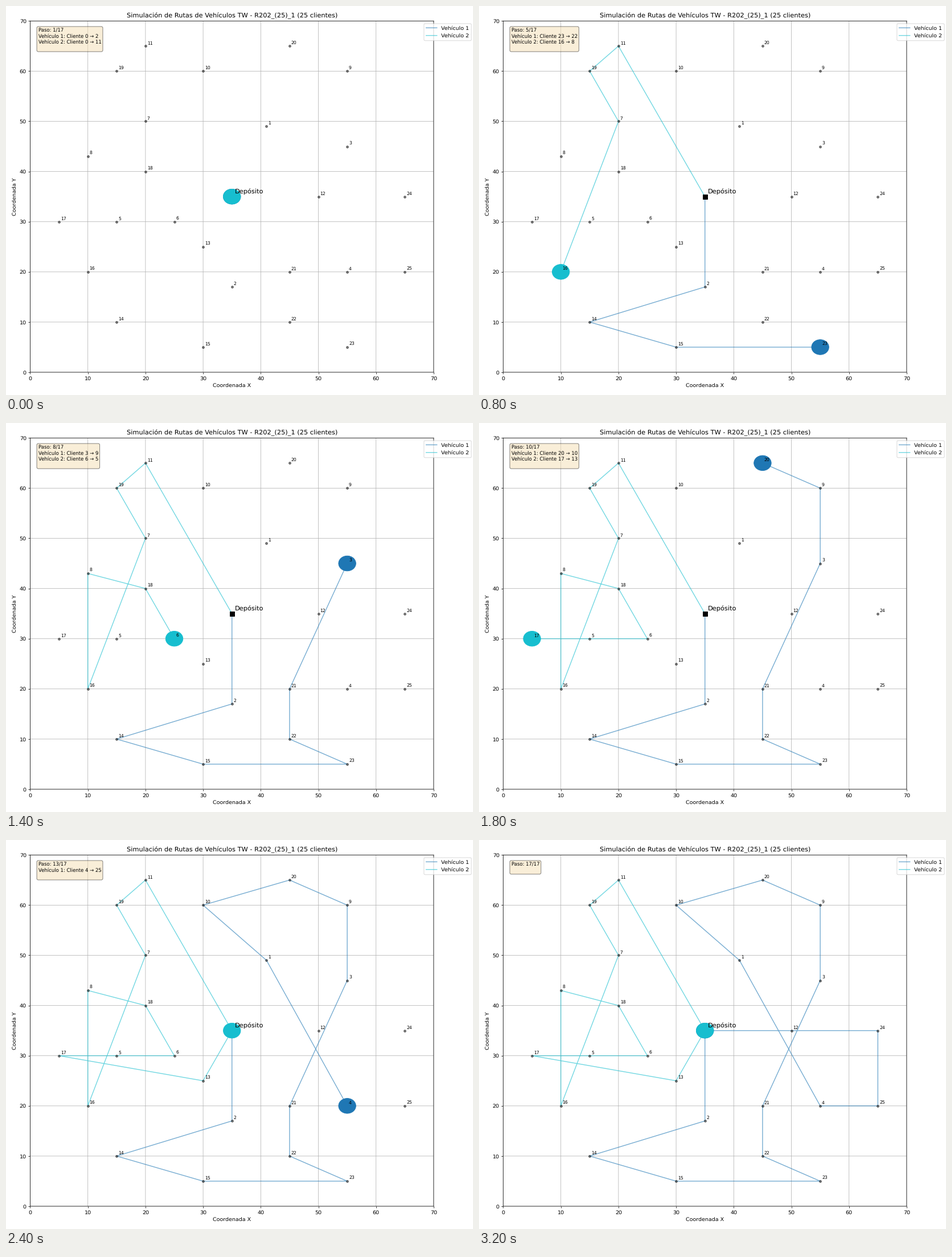
A matplotlib script that plays this animation: 820x683 px, repeating every 3400 ms.

```python
import matplotlib.pyplot as plt
from matplotlib.animation import FuncAnimation
from matplotlib.patches import Circle

# Smooth, unsnapped rendering suits the small scale.
plt.rcParams.update({"path.snap": False, "text.hinting": "none"})

DPI = 68.3334
DEPOT = (35, 35)

# Each vehicle's path: customer number -> key point, in visiting order.
PATHS = [
    {2: (35, 17), 14: (15, 10), 15: (30, 5), 23: (55, 5), 22: (45, 10),
     21: (45, 20), 3: (55, 45), 9: (55, 60), 20: (45, 65), 10: (30, 60),
     1: (41, 49), 4: (55, 20), 25: (65, 20), 24: (65, 35), 12: (50, 35)},
    {11: (20, 65), 19: (15, 60), 7: (20, 50), 16: (10, 20), 8: (10, 43),
     18: (20, 40), 6: (25, 30), 5: (15, 30), 17: (5, 30), 13: (30, 25)},
]
COLORS = ["tab:blue", "tab:cyan"]
STEPS = max(map(len, PATHS)) + 2  # leaving from and returning to the depot

fig, ax = plt.subplots(figsize=(12, 9.9955), dpi=DPI)  # 820 x 683 pixels
fig.subplots_adjust(left=0.0518, bottom=0.0585, right=0.9158, top=0.9615)
ax.set(xlim=(0, 70), ylim=(0, 70),
       xlabel="Coordenada X", ylabel="Coordenada Y",
       title="Simulación de Rutas de Vehículos TW - R202_(25)_1 (25 clientes)")
ax.grid(True)


def add_place(text, point, offset, fontsize, **marker):
    ax.plot(*point, color="black", zorder=3, **marker)
    ax.annotate(text, point, xytext=(offset, offset),
                textcoords="offset points", fontsize=fontsize, zorder=6)


class Vehicle:
    def __init__(self, number, path, color):
        self.name = f"Vehículo {number}"
        self.stops = [0, *path, 0]
        self.points = [DEPOT, *path.values(), DEPOT]
        self.trail, = ax.plot([], [], color=color, alpha=0.6, linewidth=1.5,
                              label=self.name)
        self.disc = ax.add_patch(Circle(DEPOT, 1.5, color=color, zorder=5))

    def move(self, step):
        """Go to the given stop and return the line describing the next leg."""
        visited = self.points[:step + 1]
        self.trail.set_data(*zip(*visited))
        self.disc.center = visited[-1]
        leg = self.stops[step:step + 2]
        if len(leg) < 2:
            return ""
        return f"{self.name}: Cliente {leg[0]} → {leg[1]}\n"


add_place("Depósito", DEPOT, 5, 12, marker="s", markersize=8)
for path in PATHS:
    for customer, point in path.items():
        add_place(str(customer), point, 3, 8,
                  marker="o", markersize=4, alpha=0.5)

vehicles = [Vehicle(i, path, color)
            for i, (path, color) in enumerate(zip(PATHS, COLORS), 1)]
info = ax.text(0.02, 0.98, "", transform=ax.transAxes, va="top", fontsize=9,
               zorder=6, bbox=dict(boxstyle="round", facecolor="wheat", alpha=0.5))
ax.legend(loc="upper right", bbox_to_anchor=(1.1, 1))


def update(step):
    legs = "".join(vehicle.move(step) for vehicle in vehicles)
    info.set_text(f"Paso: {step + 1}/{STEPS}\n{legs}")


anim = FuncAnimation(fig, update, frames=STEPS, interval=200,
                     repeat=True, repeat_delay=0)
plt.show()
```
